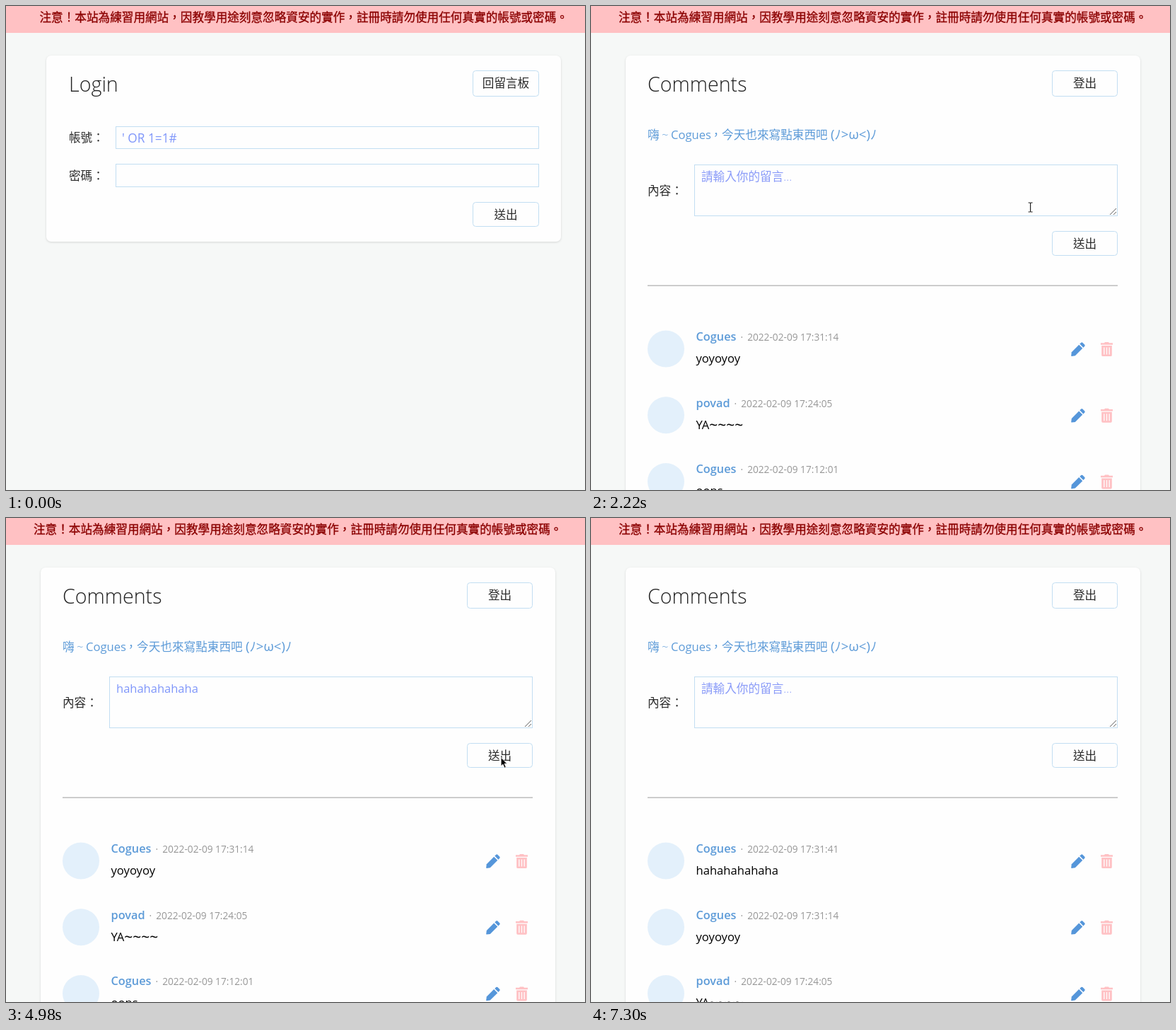
Animation of 819 by 684 pixels, one loop 7.34 s. Source, as an HTML page:

```html
<!DOCTYPE html>
<html lang="zh-TW">
<head>
<meta charset="utf-8">
<title>Guestbook</title>
<style>
  html, body { margin: 0; width: 100%; height: 100%; overflow: hidden; background: #f6f8f7; }
  svg { display: block; width: 819px; height: 684px; font: 300 16.63px "Open Sans", "Noto Sans CJK TC", sans-serif; }
  text { white-space: pre; fill: #2b2b2b; }
  .warning { font-weight: 500; fill: #8b0000; stroke: #8b0000; stroke-width: .3; }
  .title { font-size: 28.6px; fill: #222; }
  .card { fill: #fefefe; filter: drop-shadow(0 1px 1.5px #0002); }
  .box { fill: #fefefe; stroke: #c2def2; }
  .focus { stroke: #7590f3; stroke-width: 2; }
  .button { text-anchor: middle; }
  .entry, .typed { fill: #7f96fa; font-weight: 400; }
  .entry { font-size: 17.3px; }
  .typed { font-size: 16.5px; }
  .hint { fill: #8a9bf8; }
  .caret { stroke: #7590f3; stroke-width: 1.4; }
  .dots { stroke: #7590f3; stroke-width: 5.4; stroke-linecap: round; stroke-dasharray: 0 7.2; }
  .greeting { fill: #5d9bd8; }
  .face { font-size: 18.6px; font-weight: 400; }
  .name { font-weight: 600; font-size: 16.3px; fill: #5d9bd8; }
  .date { font-weight: 400; font-size: 13.7px; fill: #979797; }
  .body { font-weight: 400; font-size: 16.6px; fill: #000; }
</style>
</head>
<body>
<svg viewBox="0 0 819 684">
  <defs>
    <g id="pencil" fill="#5596da">
      <path d="M11.2 3.7 16.3 8.8 5.8 19.2 .9 19.9Q.1 20 .2 19.1L.8 14.2Z"/>
      <path d="M12.3 2.6 14.3.7Q15.3-.1 16.3.7L19.3 3.7Q20.1 4.7 19.3 5.7L17.4 7.7Z"/>
    </g>
    <g id="trash">
      <path fill="#ffc1c4" d="M0 1.3H5L6 0H11L12 1.3H17V3.8H0ZM1.2 5H15.8V18.4Q15.8 20 14.2 20H2.8Q1.2 20 1.2 18.4Z"/>
      <path stroke="#fefefe" stroke-width="1.3" d="M4.8 7.5V17.5M8.5 7.5V17.5M12.2 7.5V17.5"/>
    </g>
  </defs>
  <rect width="819" height="684" fill="#f6f8f7"/>
  <rect width="819" height="38" fill="#ffc1c3"/>
  <text id="warning" class="warning" y="22">注意！本站為練習用網站，因教學用途刻意忽略資安的實作，註冊時請勿使用任何真實的帳號或密碼。</text>

  <g id="login">
    <rect class="card" x="57" y="70" width="728" height="263" rx="7"/>
    <text class="title" x="89" y="121">Login</text>
    <rect class="box" x="660.5" y="91.5" width="93" height="36" rx="4"/>
    <text class="button" x="707" y="115">回留言板</text>
    <text x="89" y="192">帳號：</text>
    <rect class="box" x="155.5" y="170.5" width="598" height="31"/>
    <text class="entry" x="164" y="193">' OR 1=1#</text>
    <text x="89" y="246">密碼：</text>
    <rect class="box" x="155.5" y="223.5" width="598" height="32"/>
    <g id="passwordFocus">
      <rect class="box focus" x="156" y="224" width="597" height="31" rx="2"/>
      <line id="dots" class="dots" x1="168.7" y1="240" y2="240"/>
      <line id="passwordCaret" class="caret" y1="229" y2="251"/>
    </g>
    <rect class="box" x="660.5" y="277.5" width="93" height="34" rx="4"/>
    <text class="button" x="707" y="301">送出</text>
  </g>

  <g id="board">
    <rect class="card" x="49" y="70" width="728" height="700" rx="7"/>
    <text class="title" x="80" y="121">Comments</text>
    <rect class="box" x="652.5" y="91.5" width="92" height="36" rx="4"/>
    <text class="button" x="698.5" y="115">登出</text>
    <text class="greeting" y="188"><tspan x="80">嗨</tspan><tspan x="100">~</tspan><tspan x="113" font-weight="400">Cogues</tspan><tspan x="168.5">，今天也來寫點東西吧</tspan><tspan class="face" x="339">(ﾉ&gt;ω&lt;)ﾉ</tspan></text>
    <text x="80" y="267">內容：</text>
    <rect class="box" x="146.5" y="224.5" width="598" height="72"/>
    <rect id="areaFocus" class="box focus" x="147" y="225" width="597" height="71" rx="2"/>
    <path d="M734 295 743 286M739 295 743 291" stroke="#666"/>
    <text id="hint" class="hint" x="156" y="247">請輸入你的留言...</text>
    <text id="typed" class="typed" x="156" y="247"></text>
    <line id="areaCaret" class="caret" y1="230" y2="251"/>
    <rect class="box" x="652.5" y="318.5" width="92" height="34" rx="4"/>
    <text class="button" x="698.5" y="342">送出</text>
    <rect x="80" y="394.4" width="665" height="1.5" fill="#bdbdbd"/>
    <g id="rows"></g>
  </g>

  <path id="arrow" d="M0 0V12.2L2.8 9.6 5 14.8 7.1 13.9 4.9 8.8H8.6Z" stroke="#fff" stroke-width=".8"/>
  <path id="beam" d="M-3-6.5H-1L0-6 1-6.5H3M0-6V6M-3 6.5H-1L0 6 1 6.5H3" fill="none" stroke="#222" stroke-width="1.2"/>
</svg>
<script>
  const LOOP = 7340, ROW = 93.7;
  const BOARD_AT = 2000, POSTED_AT = 5150;

  const linear = u => u;
  const easeIn = power => u => u ** power;
  const easeOut = power => u => 1 - (1 - u) ** power;

  // A pointer move from a to b; bow is how far its arc dips below the straight line.
  const glide = (start, end, a, b, ease = linear, bow = 0) => ({
    start,
    at(t) {
      const k = ease(Math.min(1, (t - start) / (end - start)));
      return [a[0] + (b[0] - a[0]) * k, a[1] + (b[1] - a[1]) * k + bow * 4 * k * (1 - k)];
    }
  });

  const password = [372, 242], aside = [384, 267], loginButton = [707, 331];
  const textArea = [407, 245], postButton = [700, 338], corner = [805, 624], avatar = [107, 497];
  const glides = [
    glide(30, 600, [560, 616], password),
    glide(750, 880, password, aside),
    glide(1050, 1730, aside, loginButton, easeIn(1.57), -37),
    glide(1830, 2510, loginButton, textArea, easeIn(2.27), -27),
    glide(4210, 4870, textArea, postButton, easeOut(3.6), 53),
    glide(4980, 5690, postButton, corner),
    glide(5720, 5890, corner, [803, 690], linear, -68),
    glide(6030, 6150, [700, 690], avatar),
    glide(6310, 6990, avatar, [777, 690], linear, -322)
  ];

  const comments = [
    ['Cogues', '17:31:41', 'hahahahahaha'],
    ['Cogues', '17:31:14', 'yoyoyoy'],
    ['povad', '17:24:05', 'YA<tspan font-size="21" dy="2">~~~~</tspan>'],
    ['Cogues', '17:12:01', 'oops']
  ];

  const $ = id => document.getElementById(id);
  const show = (id, on) => $(id).setAttribute('display', on ? 'inline' : 'none');
  const place = (id, x, y) => $(id).setAttribute('transform', `translate(${x} ${y})`);
  const moveLine = (id, x) => { $(id).setAttribute('x1', x); $(id).setAttribute('x2', x); };

  // Number of keys pressed in a burst that starts at `start`.
  const burst = (t, start, interval, count) =>
    Math.max(0, Math.min(count, Math.floor((t - start) / interval) + 1));

  $('rows').innerHTML = comments.map(([name, time, body], i) => `
    <g id="row${i}" transform="translate(0 ${i * ROW})">
      <circle cx="106" cy="484.5" r="26" fill="#e3f0fb"/>
      <text x="148.5" y="473"><tspan class="name">${name}</tspan><tspan class="date" dx="6">·</tspan><tspan class="date" dx="6">2022-02-09 ${time}</tspan></text>
      <text class="body" x="148.5" y="504">${body}</text>
      <use href="#pencil" x="679" y="475"/>
      <use href="#trash" x="721" y="475"/>
    </g>`).join('');

  function drawPointer(t, onBoard) {
    const move = glides.filter(g => g.start <= t).pop();
    const [x, y] = move ? move.at(t) : [0, -50];
    const [left, top, right, bottom] = onBoard ? [146, 224, 745, 297] : [155, 223, 754, 256];
    const overField = x > left && x < right && y > top && y < bottom;
    show('arrow', !overField);
    show('beam', overField);
    place(overField ? 'beam' : 'arrow', x, y);
  }

  function drawLogin(t) {
    const dots = burst(t, 700, 45, 5) + burst(t, 1050, 95, 4);
    show('passwordFocus', t >= 620);
    show('dots', dots > 0);
    $('dots').setAttribute('x2', 168.75 + (dots - 1) * 7.2);
    moveLine('passwordCaret', 165.5 + dots * 7.2);
  }

  function drawBoard(t) {
    const posted = t >= POSTED_AT;
    const focused = t >= 2590 && t < 4860;
    const keys = posted ? 0 : burst(t, 3050, 125, 3) + burst(t, 3460, 80, 9);
    show('areaFocus', focused);
    show('areaCaret', focused);
    show('hint', !keys);
    $('typed').textContent = 'ha'.repeat(6).slice(0, keys);
    moveLine('areaCaret', 156.5 + (keys ? $('typed').getComputedTextLength() : 0));
    show('row0', posted);
    place('rows', 0, posted ? 0 : -ROW);
  }

  function draw() {
    const t = performance.now() % LOOP;
    const onBoard = t >= BOARD_AT;
    show('login', !onBoard);
    show('board', onBoard);
    $('warning').setAttribute('x', onBoard ? 39 : 47.5);
    if (onBoard) drawBoard(t); else drawLogin(t);
    drawPointer(t, onBoard);
    requestAnimationFrame(draw);
  }
  draw();
</script>
</body>
</html>
```
